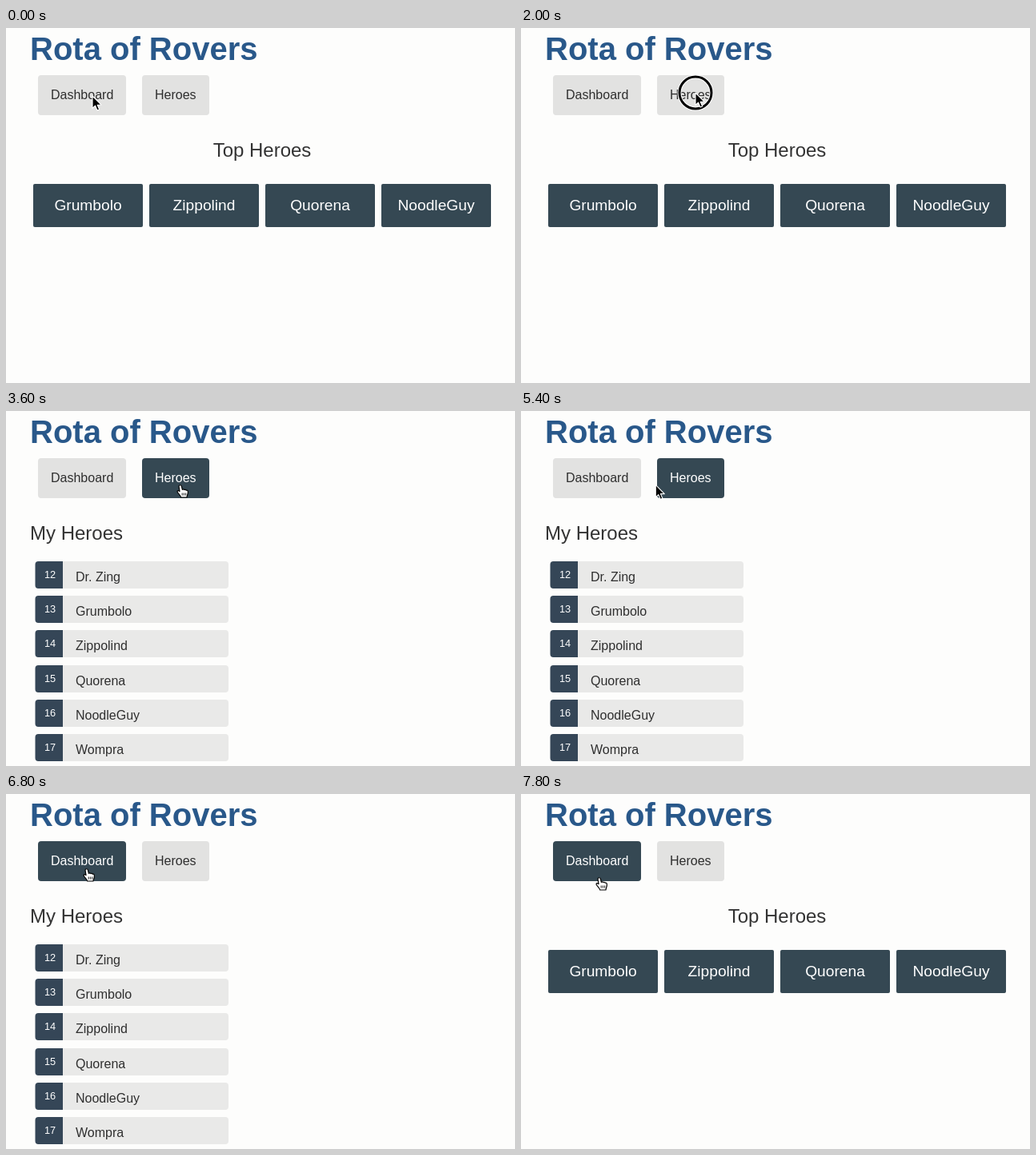
Write an HTML page that moves like this. It is 636 by 444 pixels and loops after 8 s.

```html
<!DOCTYPE html>
<html lang="en">
<head>
<meta charset="utf-8">
<title>Rota of Rovers</title>
<style>
  html, body { margin: 0; width: 100%; height: 100%; overflow: hidden; background: #fdfdfc; }
  svg { display: block; width: 636px; height: 444px; font-family: "Liberation Sans", Arial, sans-serif; }
  .title { font-size: 40px; font-weight: bold; fill: #29588a; }
  .heading { font-size: 24px; fill: #333; }
  .link { font-size: 16px; }
  .link rect { fill: #e2e2e1; }
  .link text { fill: #2f2f2f; }
  .link.on rect { fill: #354853; }
  .link.on text { fill: #fff; }
  .card rect { fill: #354853; }
  .badge { fill: #354657; }
  .card text { font-size: 19.2px; fill: #fff; }
  .row { fill: #e9e9e8; }
  .name { font-size: 16px; fill: #2f2f2f; }
  .id { font-size: 12.8px; fill: #fff; }
  .mid { text-anchor: middle; }
</style>
</head>
<body>
<svg viewBox="0 0 636 444">
  <text class="title" x="30" y="40">Rota of Rovers</text>
  <g class="link" id="dashLink"><rect x="40" y="59" width="110" height="50" rx="4"/><text x="56" y="89">Dashboard</text></g>
  <g class="link" id="listLink"><rect x="170" y="59" width="84" height="50" rx="4"/><text x="186" y="89">Heroes</text></g>
  <g id="dashView"><text class="heading mid" x="320" y="161">Top Heroes</text></g>
  <g id="listView"><text class="heading" x="30" y="161">My Heroes</text></g>
  <g id="ring" fill="none">
    <circle stroke="#fff" stroke-width="5"/>
    <circle stroke="#000" stroke-width="3"/>
  </g>
  <g id="pointer" stroke-linejoin="round">
    <path id="arrow" fill="#000" stroke="#fff" stroke-width="1.1"
      d="M0 0V15.5L3.5 12.2L6 18L8.6 16.9L6.2 11.2H11Z"/>
    <g id="hand">
      <path fill="#fff" stroke="#000" stroke-width="1.2"
        d="M-2 2.4C-2 .3 1 .2 1.4 2.2L2.4 6.4Q3.8 5.2 5 6.6Q6.4 5.7 7.2 7.2Q9 6.7 9.3 8.6C9.8 11.6 8.2 13 8 16H.6C.2 13.6-2.8 11.6-3.8 9.2C-4.4 7.4-2.2 7-1 8.6Z"/>
      <path fill="none" stroke="#000" stroke-width=".9" d="M2.2 10.5V13.6M4.4 10.5V13.6M6.6 10.5V13.6"/>
    </g>
  </g>
</svg>
<script>
const LOOP = 8000, STEP = 200;
const heroes = ['Dr. Zing', 'Grumbolo', 'Zippolind', 'Quorena', 'NoodleGuy', 'Wompra'];
const el = id => document.getElementById(id);

function add(parent, tag, attrs, text = '') {
  const node = document.createElementNS(parent.namespaceURI, tag);
  for (const key in attrs) node.setAttribute(key, attrs[key]);
  node.textContent = text;
  return parent.appendChild(node);
}

heroes.slice(1, 5).forEach((name, i) => {
  const x = 34 + i * 145;
  const card = add(el('dashView'), 'g', { class: 'card' });
  add(card, 'rect', { x, y: 195, width: 137, height: 54, rx: 2 });
  add(card, 'text', { class: 'mid', x: x + 68.5, y: 228 }, name);
});

heroes.forEach((name, i) => {
  const y = Math.round(188 + i * 43.2), view = el('listView');
  add(view, 'rect', { class: 'row', x: 37, y, width: 241, height: 34, rx: 4 });
  add(view, 'path', { class: 'badge', d: `M71 ${y}v34H40.5q-4 0-4-4v-26q0-4 4-4z` });
  add(view, 'text', { class: 'id', x: 48, y: y + 21 }, 12 + i);
  add(view, 'text', { class: 'name', x: 87, y: y + 25 }, name);
});

// Pointer stops: time, x, y
const path = [
  [0, 108, 85], [800, 108, 85], [1600, 218, 81], [2200, 218, 81], [2800, 218, 92],
  [5040, 218, 92], [5840, 101, 93], [7200, 101, 93], [7800, 98, 104]
];
// Click ring: start, end, first radius, growth per step
const clicks = [[2000, 2400, 20, 9.5], [3200, 3600, 20, 9.5], [7000, 7200, 20, 9.5]];

const within = (t, from, to) => t >= from && t < to;
const show = (node, on) => { node.style.display = on ? '' : 'none'; };

function pointerAt(t) {
  const i = path.findIndex(stop => stop[0] > t);
  if (i < 0) return path[path.length - 1].slice(1);
  const [t0, x0, y0] = path[i - 1], [t1, x1, y1] = path[i];
  const p = (t - t0) / (t1 - t0), ease = p * p * (3 - 2 * p);
  return [x0 + (x1 - x0) * ease, y0 + (y1 - y0) * ease];
}

function draw(t) {
  const [x, y] = pointerAt(t);
  const place = `translate(${x} ${y})`;
  el('pointer').setAttribute('transform', place);
  el('ring').setAttribute('transform', place);

  // Links react only once the first click has focused the window
  const onHand = t >= 2400 && (x >= 170 || x <= 150);
  show(el('hand'), onHand);
  show(el('arrow'), !onHand);

  const click = clicks.find(([from, to]) => within(t, from, to));
  show(el('ring'), click);
  if (click) {
    const r = click[2] + click[3] * (t - click[0]) / STEP;
    for (const circle of el('ring').children) circle.setAttribute('r', r);
  }

  el('listLink').classList.toggle('on', within(t, 2400, 5600));
  el('dashLink').classList.toggle('on', t >= 5600);
  const listOpen = within(t, 3600, 7200);
  show(el('listView'), listOpen);
  show(el('dashView'), !listOpen);
}

function tick() {
  draw(Math.floor(performance.now() % LOOP / STEP) * STEP);
  requestAnimationFrame(tick);
}
tick();
</script>
</body>
</html>
```
